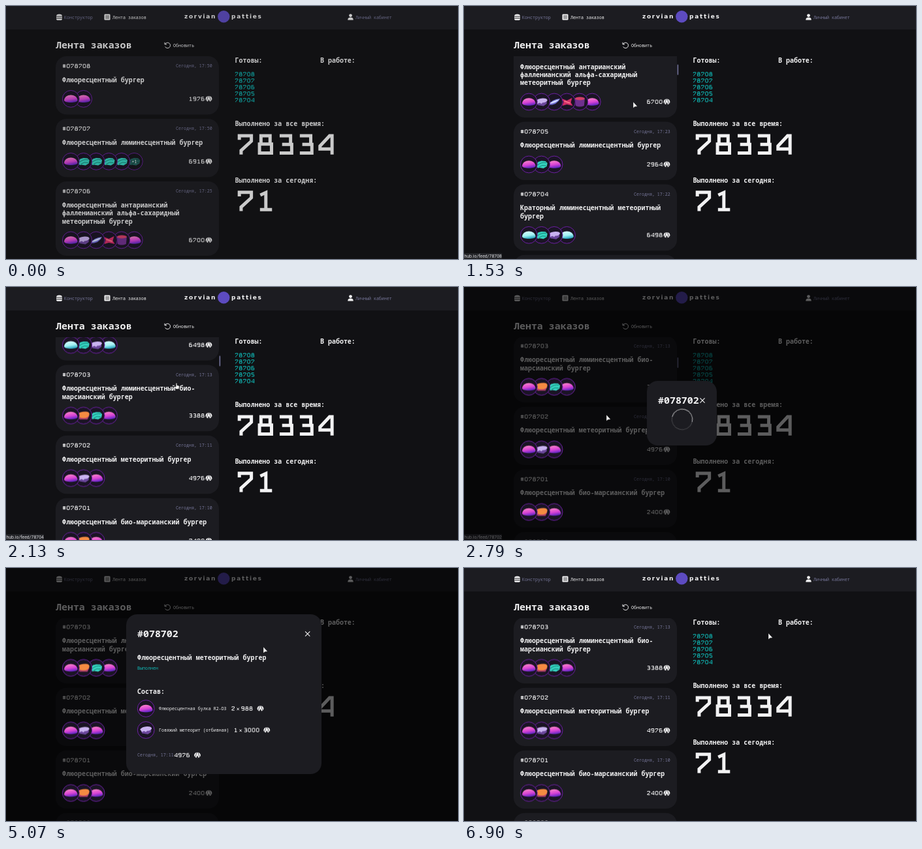
Write an HTML page that moves like this. It is 692 by 388 pixels and loops after 6960 ms.

```html
<!DOCTYPE html>
<html lang="ru">
<head>
<meta charset="utf-8">
<title>Лента заказов</title>
<style>
html, body { margin: 0; width: 100%; height: 100%; overflow: hidden; background: #111114; }
svg { display: block; }
text { font-family: "Noto Sans Mono", "DejaVu Sans Mono", monospace; fill: #f2f2f3; white-space: pre; }
.b { font-weight: 600; }
.grey { fill: #77779a; }
.teal { fill: #10bcb9; }
.logo { font: bold 9px "DejaVu Sans", sans-serif; letter-spacing: 1.7px; }
.link { font-family: Roboto, sans-serif; fill: #dcdce0; }
.glyphs { fill: none; stroke: #f2f2f3; stroke-width: 10; }
.glyphs.teal { stroke: #10bcb9; }
.line { fill: none; stroke: #f2f2f3; }

.scroll { animation: scroll 6.96s ease-out infinite; }
.cursor { animation: move 6.96s ease-in-out infinite; }
.status { animation: status 6.96s linear infinite; }
.fade { animation: fade 6.96s linear infinite; }
.spin { animation: spin 1s linear infinite; }

@keyframes scroll {
  0%, 16% { transform: translateY(0); animation-timing-function: linear; }
  21.98% { transform: translateY(calc(var(--k) * 212px)); }
  23.3% { transform: translateY(calc(var(--k) * 216px)); animation-timing-function: linear; }
  27.59% { transform: translateY(calc(var(--k) * 377px)); }
  33.6%, 100% { transform: translateY(calc(var(--k) * 518.5px)); }
}
@keyframes move {
  0%, 3% { transform: translate(597px, -14px); }
  12.9%, 15.1% { transform: translate(326px, 157px); }
  18.5% { transform: translate(262px, 148px); }
  22% { transform: translate(259px, 147px); }
  27.6%, 32% { transform: translate(261px, 147px); }
  34% { transform: translate(246px, 159px); }
  36.2%, 61% { transform: translate(218px, 196px); }
  69.4%, 73% { transform: translate(394px, 121px); }
  79.7%, 100% { transform: translate(466px, 100px); }
}
@keyframes status {
  0%, 16% { opacity: 0; }
  16.5%, 38.8% { opacity: 1; }
  41%, 100% { opacity: 0; }
}
@keyframes fade {
  0%, .4% { opacity: .18; }
  .5%, 3% { opacity: .15; }
  12.9%, 100% { opacity: 0; }
}
@keyframes spin { to { transform: rotate(360deg); } }
</style>
</head>
<body>
<script>
const LOOP = 6960;
const SMALL = 6.65, MID = 9.97, LARGE = 14.95;
let css = '', count = 0;

// Shows content only inside the given [from, to] ranges (ms).
function during(ranges, content) {
  const name = 'show' + count++;
  const at = (t, o) => `${(t / LOOP * 100).toFixed(3)}%{opacity:${o}}`;
  css += `@keyframes ${name}{0%{opacity:0}${ranges.map(([a, b]) => at(a, 1) + at(b, 0)).join('')}}`;
  return `<g style="animation:${name} ${LOOP}ms step-end infinite">${content}</g>`;
}

const put = (x, y, content) => `<g transform="translate(${x} ${y})">${content}</g>`;

// Text whose capitals are centred on cy.
const text = (x, cy, str, size, cls = '') =>
  `<text x="${x}" y="${(cy + size * .36).toFixed(2)}" font-size="${size}" class="${cls}">${str}</text>`;

// Square display digits: 100 units per em, drawn as strokes.
const GLYPHS = {
  0: 'M16 4.5H46L49.5 8V54L46 57.5H16L12.5 54V8Z',
  1: 'M15 13L32 5V57.5M14 57.5H51',
  2: 'M12.5 14V4.5H49.5V24L12.5 48V57.5H51',
  3: 'M12.5 4.5H46V31H20M46 31H49.5V57.5H12.5',
  4: 'M49.5 62V4.5H42L12.5 36V45H54',
  5: 'M49.5 4.5H12.5V28H46L49.5 31V57.5H12.5',
  6: 'M46 4.5H12.5V57.5H49.5V28H12.5',
  7: 'M12.5 17V4.5H49.5V21L18 50V62',
  8: 'M17 30V4.5H45V30M12.5 30H49.5V57.5H12.5Z',
  9: 'M49.5 31H12.5V4.5H49.5V57.5H14',
  '#': 'M22 4V58M40 4V58M8 20H54M8 42H54',
  x: 'M9 22L41 57M41 22L9 57',
  ' ': ''
};
const ADVANCE = { x: 50, ' ': 19 };

function digits(x, cy, str, size = MID, cls = '') {
  let dx = 0, body = '';
  for (const ch of str) {
    body += `<path transform="translate(${dx} 0)" d="${GLYPHS[ch]}"/>`;
    dx += ADVANCE[ch] || 62;
  }
  return `<g class="glyphs ${cls}" role="img" aria-label="${str}"
    transform="translate(${x} ${cy - size * .31}) scale(${size / 100})">${body}</g>`;
}

const coin = (x, y, back = '#1c1c21') => put(x, y,
  `<ellipse rx="4.9" ry="4.3" fill="#f2f2f3"/>
   <path d="M0 .6L1.8 4.6H-1.8Z" fill="${back}"/>
   <path d="M-.8 -4.4L-3.6 3.4M.8 -4.4L3.6 3.4" stroke="${back}" stroke-width=".7"/>`);

const DOME = 'M-10.3 2.4C-9.6 -8.6 9.6 -8.6 10.3 2.4C9.4 6.8 -9.4 6.8 -10.3 2.4Z';
const FOOD = {
  bun: `<path d="${DOME}" fill="url(#pink)"/>`,
  ice: `<path d="${DOME}" fill="url(#cyan)"/>`,
  leaf: `<path d="M-8 0L-5 -4L0 -5.4L6 -5L9 -2L8 3L3 6L-3 5L-6 5.6Z" fill="#35d3c0"/>
    <path d="M-6 1Q0 -4 7 -2.5M-4 4Q1 0 7 2" fill="none" stroke="#157f74" stroke-width="1"/>`,
  meat: `<path d="M-8 -1L-6 5L3 6.4L8 3V-2Z" fill="#6b479c"/>
    <path d="M-9 -1Q-6 -5 2 -5.4Q9 -5.4 9 -2Q6 2 2 1L0 3L-3 1.4L-6 3Z" fill="#c9b2f0"/>`,
  mars: `<path d="M-9 0L-6 6H6L9 0Z" fill="#b13f6d"/>
    <path d="M-9 -2Q-6 -6 3 -6Q9 -6 9 -2Q8 4 0 4Q-8 4 -9 -2Z" fill="#f58b42"/>`,
  fish: `<path d="M-9 5Q-4 -4 9 -5Q5 5 -9 5Z" fill="#6d6bd0"/>
    <path d="M-8 3Q-2 -2 8 -4Q2 3 -8 3Z" fill="#d5dcff"/>`,
  crab: `<path d="M-8 -5L0 -2L8 -6L6 1L9 6L0 4L-7 6L-5 0Z" fill="#d32d68"/>
    <path d="M-4 -1L5 2" stroke="#ff7d8e" stroke-width="1.4"/>`,
  cask: `<path d="M-7 -5H8L7 6Q0 9 -6 6Z" fill="#70308f"/>
    <ellipse cx=".5" cy="-5" rx="7.5" ry="2.6" fill="#d33f69"/>`
};

function food(kind, x, y) {
  const more = kind === 'more';
  return put(x, y, `<circle r="12.9" fill="#1a1424" stroke="#6f21a6" stroke-width="1"/>
    ${FOOD[more ? 'leaf' : kind]}
    ${more ? '<circle r="12.4" fill="#131316" opacity=".6"/>' + text(-4, 0, '+1', SMALL) : ''}`);
}

const orders = [
  ['078708', '17:50', ['Флюоресцентный бургер'], '1976', 'bun bun'],
  ['078707', '17:50', ['Флюоресцентный люминесцентный бургер'], '6916', 'bun leaf leaf leaf leaf more'],
  ['078706', '17:25', ['Флюоресцентный антарианский', 'фалленианский альфа-сахаридный', 'метеоритный бургер'],
    '6700', 'bun meat fish crab cask bun'],
  ['078705', '17:23', ['Флюоресцентный люминесцентный бургер'], '2964', 'bun leaf bun'],
  ['078704', '17:22', ['Краторный люминесцентный метеоритный', 'бургер'], '6498', 'ice leaf meat ice'],
  ['078703', '17:13', ['Флюоресцентный люминесцентный био-', 'марсианский бургер'], '3388', 'bun mars leaf bun'],
  ['078702', '17:11', ['Флюоресцентный метеоритный бургер'], '4976', 'bun meat bun'],
  ['078701', '17:10', ['Флюоресцентный био-марсианский бургер'], '2400', 'bun mars bun'],
  ['078700', '17:09', ['Флюоресцентный бургер'], '1976', 'bun bun']
];

let cardTop = 77, cards = '', foods = '';
for (const [id, time, lines, price, kinds] of orders) {
  const h = 89.4 + (lines.length - 1) * 12.3;
  const low = cardTop + h - 24;
  cards += `<rect x="76" y="${cardTop}" width="250" height="${h}" rx="16.6" fill="#1c1c21"/>`
    + digits(86, cardTop + 15, '#' + id)
    + text(260, cardTop + 15, 'Сегодня, ' + time, SMALL, 'grey')
    + lines.map((s, i) => text(86, cardTop + 36.2 + i * 12.4, s, MID, 'b')).join('')
    + digits(279.6, low, price) + coin(310.5, low);
  foods += kinds.split(' ').map((k, i) => food(k, 99.3 + i * 19.4, low)).reverse().join('');
  cardTop += h + 6.6;
}
const pane = content => `<g clip-path="url(#pane)"><g class="scroll" style="--k:-1">${content}</g></g>`;

const header = `<rect width="692" height="36" fill="#1c1c21"/>
  <path d="M77 15.6Q77 12.4 81.5 12.4Q86 12.4 86 15.6ZM77 16.6H86V18.2H77ZM77 19.2H86Q86 21.8 83.5 21.8H79.5Q77 21.8 77 19.2Z" fill="#f2f2f3"/>
  ${text(89, 17.2, 'Конструктор', SMALL, 'grey')}
  <rect x="150.5" y="12.5" width="9" height="9" rx="1.2" fill="#f2f2f3"/>
  <path d="M152.2 15H158M152.2 17H158M152.2 19H158" stroke="#1c1c21" stroke-width=".8"/>
  ${text(163, 17.2, 'Лента заказов', SMALL)}
  <text x="273" y="19" class="logo">zorvian</text>
  <circle cx="333.3" cy="16.3" r="9.2" fill="#5d4bc0"/>
  <text x="345" y="19" class="logo">patties</text>
  <circle cx="527.5" cy="14.6" r="2.4" fill="#f2f2f3"/>
  <path d="M523.3 21.6Q523 17.6 527.5 17.6Q532 17.6 531.7 21.6Z" fill="#f2f2f3"/>
  ${text(535, 17.2, 'Личный кабинет', SMALL, 'grey')}`;

const page = text(76, 60, 'Лента заказов', LARGE, 'b')
  + `<path class="line" d="M243.6 58.4A4.2 4.2 0 1 1 243.6 62.4M243 55.8V58.8H246" stroke-width="1"/>`
  + text(256, 60.5, 'Обновить', SMALL)
  + text(350.5, 83, 'Готовы:', MID, 'b') + text(481, 83, 'В работе:', MID, 'b')
  + [8, 7, 6, 5, 4].map((n, i) => digits(350, 104.5 + i * 9.95, '7870' + n, MID, 'teal')).join('')
  + text(350.5, 180.5, 'Выполнено за все время:', MID, 'b') + digits(351, 212.2, '78334', 49.8)
  + text(350.5, 267, 'Выполнено за сегодня:', MID, 'b') + digits(351, 299, '71', 49.8);

const thumb = during([[1150, 3000]],
  '<rect class="scroll" style="--k:.06" x="326.6" y="77" width="1.6" height="16" rx=".8" fill="#74749c"/>');

const cross = (x, y) => put(x, y, '<path class="line" d="M-3.6 -3.6L3.6 3.6M3.6 -3.6L-3.6 3.6" stroke-width="1.1"/>');
const box = (x, y, w, h) => `<rect x="${x}" y="${y}" width="${w}" height="${h}" rx="16.6" fill="#1c1c21"/>`;

const loader = box(280, 144, 107, 99) + text(297, 174, '#078702', LARGE, 'b') + cross(365, 174)
  + put(334, 203, `<g class="spin"><circle class="line" r="15.8" stroke-width=".8" opacity=".25"/>
    <path class="line" d="M0 -15.8A15.8 15.8 0 0 1 0 15.8" stroke-width="1" opacity=".65"/></g>`);

const row = (y, kind, name, x, sum, cx) =>
  food(kind, 214.2, y) + text(234, y, name, SMALL) + digits(x, y, sum) + coin(cx, y);

const details = box(184, 71, 299, 245)
  + text(201, 101, '#078702', LARGE, 'b') + cross(461.7, 101)
  + text(201, 137.5, 'Флюоресцентный метеоритный бургер', MID, 'b')
  + text(201, 153.5, 'Выполнен', SMALL, 'teal')
  + text(201, 189.5, 'Состав:', MID, 'b')
  + row(215.5, 'bun', 'Флюоресцентная булка R2-D3', 344.6, '2 x 988', 389.5)
  + row(248.5, 'meat', 'Говяжий метеорит (отбивная)', 348.6, '1 x 3000', 399.3)
  + text(201, 287, 'Сегодня, 17:11', SMALL, 'grey') + digits(257, 287, '4976') + coin(293, 287);

const link = (from, to, id) => during([[from, to]], text(.5, 383.4, 'hub.io/feed/' + id, 6.9, 'link'));
const status = `<g class="status"><rect y="379" width="58" height="9" fill="#232428"/>
  ${link(1110, 1650, 78708)}${link(1650, 2080, 78705)}${link(2080, 2400, 78704)}${link(2400, 2880, 78702)}</g>`;

const arrow = '<path d="M0 0V9.6L2.3 7.4L6.4 6.9Z" fill="#fff" stroke="#111" stroke-width=".4"/>';
const hand = `<path d="M-.8 .8Q0 -.4 .8 .8V3.8L3.6 4.4Q4.4 4.8 4.2 6L3.6 9.6H-.8L-3 6.2Q-3 5 -1.8 5.6L-.8 6.4Z"
  fill="#fff" stroke="#111" stroke-width=".4"/>`;
const cursor = `<g class="cursor">
  ${during([[0, 1650], [2700, 5565], [5985, LOOP]], arrow)}
  ${during([[1650, 2700], [5565, 5985]], hand)}</g>`;

const gradient = (id, a, b, c) => `<linearGradient id="${id}" x1=".3" y1="0" x2=".6" y2="1">
  <stop stop-color="${a}"/><stop offset=".55" stop-color="${b}"/><stop offset="1" stop-color="${c}"/></linearGradient>`;

document.body.innerHTML = `<svg width="692" height="388" viewBox="0 0 692 388">
  <defs>
    ${gradient('pink', '#fa86c8', '#d944d6', '#5a25c4')}
    ${gradient('cyan', '#d8fbff', '#a4f3f4', '#1fa0bc')}
    <clipPath id="pane"><rect x="70" y="77" width="258" height="311"/></clipPath>
  </defs>
  <rect width="692" height="388" fill="#111114"/>
  ${header}${page}${pane(cards)}${thumb}
  ${during([[2690, 5985]], '<rect width="692" height="388" opacity=".62"/>')}
  ${pane(foods)}
  ${during([[2690, 3000]], loader)}
  ${during([[3000, 5985]], details)}
  ${status}
  <rect class="fade" width="692" height="388" fill="#111114"/>
  ${cursor}
</svg>`;
document.head.appendChild(document.createElement('style')).textContent = css;
</script>
</body>
</html>
```
